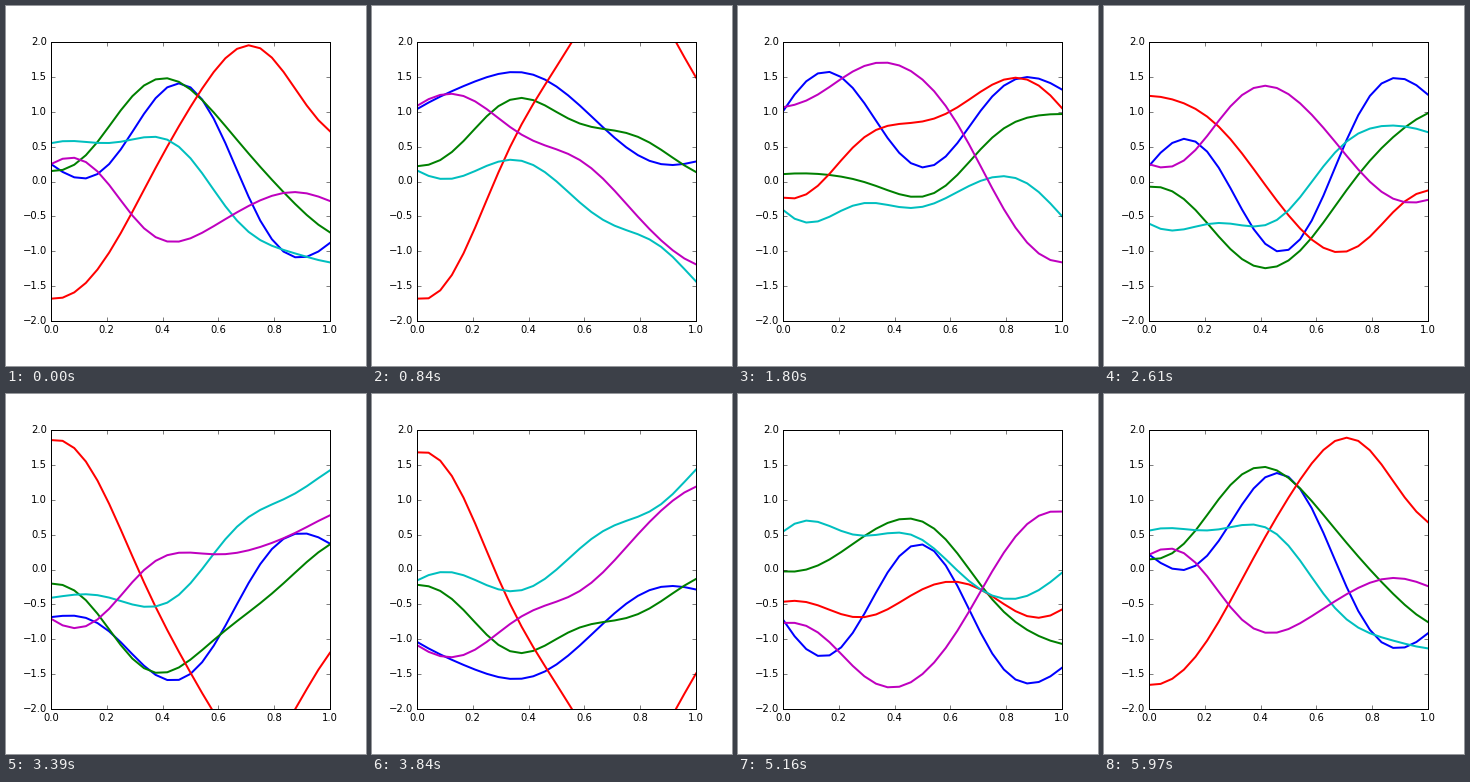
These frames come from a looping animation (360 px wide and 360 px high, 6 s). A matplotlib script:

```python
import numpy as np
import matplotlib.pyplot as plt
from matplotlib.animation import FuncAnimation

FRAMES, INTERVAL = 200, 30
LENGTH = 0.2  # kernel length scale

plt.style.use("classic")
plt.rcParams.update({
    "font.family": "DejaVu Sans",
    "font.size": 10,
    "figure.facecolor": "white",
    "figure.dpi": 72,
    "savefig.dpi": "figure",
})

# Key points of each curve: real part at the start, imaginary part a quarter turn later
KEYS = {
    "b": [.25+1.14j, .06+1.53j, .46+1.56j, 1.35+.87j, .9+.67j, -.56+1.1j, -1.08+1.2j, -.88+1.1j],
    "g": [.15+.16j, .24+.2j, 1.02+.37j, 1.48+.29j, .99+.26j, .21+.73j, -.48+.84j, -.73+.78j],
    "r": [-1.68-.79j, -1.59-.71j, -.74+.27j, .5+1.03j, 1.57+1.53j, 1.91+2.08j, 1.09+1.8j, .72+1.34j],
    "c": [.55-.25j, .58-.43j, .57-.18j, .6-.19j, -.12-.29j, -.84-.21j, -1.08-.51j, -1.16-.9j],
    "m": [.25+1.2j, .34+1.33j, -.27+1.57j, -.86+1.47j, -.64+.93j, -.27-.19j, -.17-1.14j, -.28-1.31j],
}

x = np.linspace(0, 1, 25)
knots = np.array([0, *np.arange(1, 12, 2) / 12, 1])


def kernel(a, b):
    return np.exp(-0.5 * ((a[:, None] - b) / LENGTH) ** 2)


def smooth(values):
    """Gaussian process mean through the key points."""
    return kernel(x, knots) @ np.linalg.solve(kernel(knots, knots), np.array(values))


fig = plt.figure(figsize=(5, 5))
ax = fig.add_axes([0.125, 0.125, 0.775, 0.775])
ax.set(xlim=(0, 1), ylim=(-2, 2),
       xticks=np.linspace(0, 1, 6), yticks=np.linspace(-2, 2, 9))

curves = [(ax.plot([], [], color=color, lw=2)[0], smooth(keys))
          for color, keys in KEYS.items()]


def update(i):
    turn = np.exp(-2j * np.pi * i / FRAMES)
    for line, z in curves:
        line.set_data(x, (z * turn).real)
    return [line for line, _ in curves]


anim = FuncAnimation(fig, update, frames=FRAMES, interval=INTERVAL,
                     repeat=True, repeat_delay=0, blit=False)
plt.show()
```
